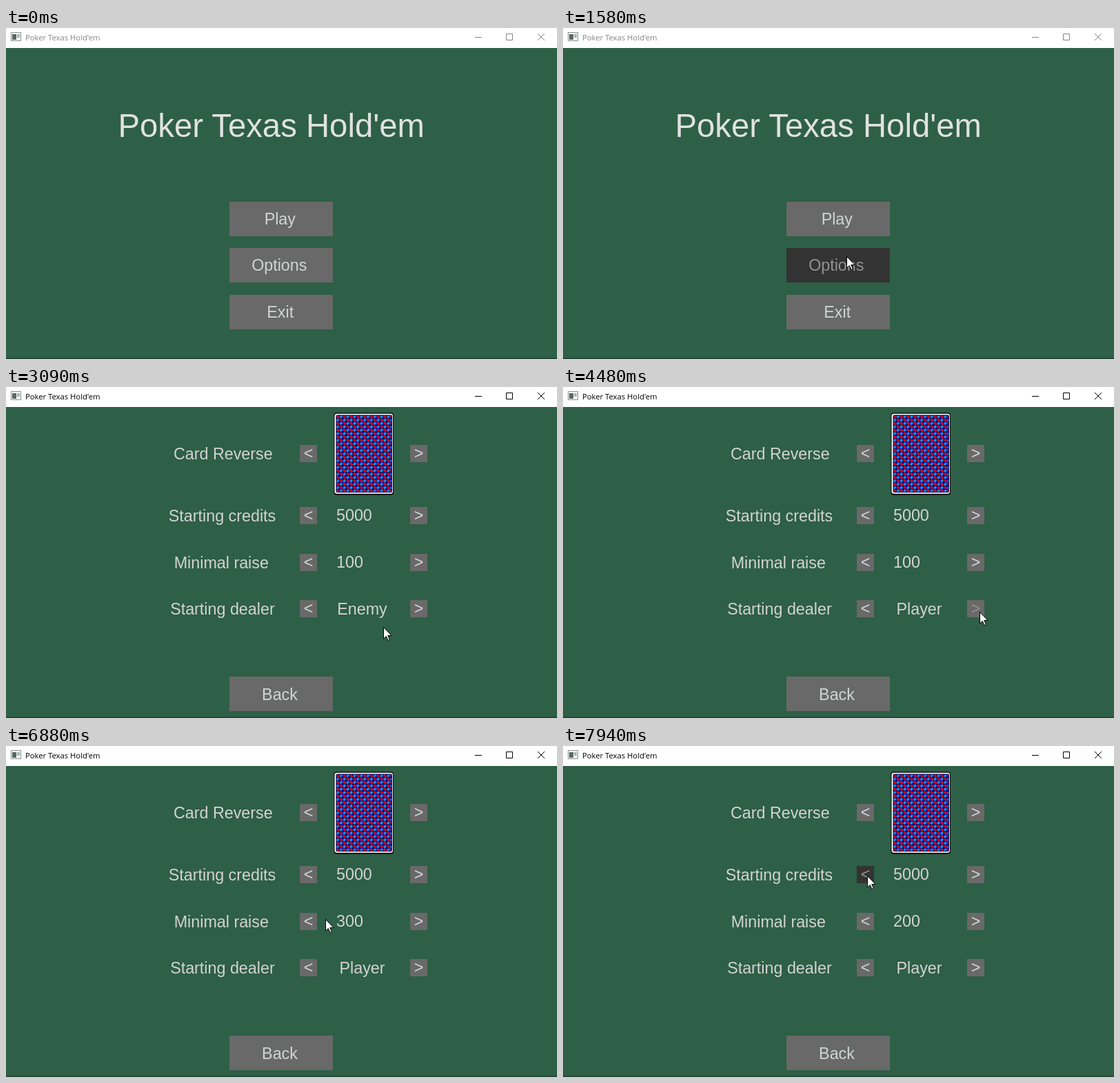
Write an HTML page that moves like this. It is 799 px wide and 480 px high and loops after 7990 ms.

```html
<!DOCTYPE html>
<html lang="en">
<head>
<meta charset="utf-8">
<title>Poker menu</title>
<style>
  html, body { margin: 0; width: 100%; height: 100%; overflow: hidden; background: #2e5f47; }
  svg { display: block; }
  text { font: 23.3px "Liberation Sans", Arial, sans-serif; fill: #d3d3d3; }
  .mid { text-anchor: middle; }
  .heading { font-size: 47.3px; fill: #e0e2e0; }
  .button rect { fill: #696969; }
  .button text { fill: #d0d6d3; }
  .button.hover rect { fill: #333; }
  .button.hover text, .button.flash text { fill: #929292; }
  .button.flash rect { fill: #696969; }
  #bar { color: #858585; }
  #bar.active { color: #000; }
  #bar text { font: 11.25px "Open Sans", "Noto Sans", sans-serif; fill: currentColor; }
  #bar path { fill: none; stroke: currentColor; }
</style>
</head>
<body>
<svg width="799" height="480" viewBox="0 0 799 480">
  <defs>
    <pattern id="weave" x="478.5" y="40.5" width="9.8" height="9.8" patternUnits="userSpaceOnUse">
      <rect width="10" height="10" fill="#0c1a9c"/>
      <path d="M0 4.9H9.8M4.9 0V9.8" stroke="#000040" stroke-width="1.2"/>
      <path d="M1 1L4.4 4.4M6 6L8.8 8.8" stroke="#f00010" stroke-width="3"/>
      <path d="M6 3.8L8.6 1.4M1.2 8.6L3.8 6.2" stroke="#20d8ff" stroke-width="2.5"/>
      <path d="M4.9 0L9.8 4.9M0 4.9L4.9 9.8" stroke="#0030e0" stroke-width=".9"/>
    </pattern>
  </defs>

  <rect width="799" height="480" fill="#2e5f47"/>
  <rect y="478.7" width="799" height="1.3" fill="#1d3c2d"/>

  <g id="bar">
    <rect width="799" height="29" fill="#fff"/>
    <rect x="7.5" y="6.5" width="14" height="12" fill="#f2f4f4" stroke="#8c9494"/>
    <rect x="9" y="9" width="6" height="8" fill="#596864"/>
    <rect x="16" y="9" width="4" height="5" fill="#a9b9b6"/>
    <text x="28" y="18">Poker Texas Hold'em</text>
    <path d="M680 13.5H690M725.5 8.5H734.5V17.5H725.5ZM771 8L781 18M781 8L771 18"/>
  </g>

  <g id="menu">
    <text class="heading" x="162.4" y="157.5">Poker Texas Hold'em</text>
  </g>

  <g id="options">
    <rect x="475.5" y="37.5" width="86.5" height="119" rx="4" fill="#000"/>
    <rect x="476.5" y="38.7" width="84.5" height="116" rx="3" fill="#fff"/>
    <rect x="479" y="41" width="80.5" height="111.5" rx="1" fill="url(#weave)" stroke="#000050"/>
    <text class="mid" x="314.8" y="105">Card Reverse</text>
    <text class="mid" x="313.5" y="195">Starting credits</text>
    <text class="mid" x="312.3" y="262.5">Minimal raise</text>
    <text class="mid" x="313.9" y="330">Starting dealer</text>
    <text x="479" y="194">5000</text>
    <text id="raise" x="479" y="261.5"></text>
    <text id="dealer" class="mid" x="516.5" y="330"></text>
  </g>

  <path id="cursor" d="M.5 .5V17L4.3 13.4L7 19.5L9.4 18.5L6.8 12.5H12Z" fill="#fff" stroke="#000"/>
</svg>
<script>
const LOOP = 7990;
const $ = id => document.getElementById(id);
const menu = $('menu'), options = $('options');
const buttons = [];

function addButton(page, label, x, y, w, h, textX, textY) {
  const node = document.createElementNS('http://www.w3.org/2000/svg', 'g');
  node.innerHTML = `<rect x="${x}" y="${y}" width="${w}" height="${h}"/>
    <text class="mid" x="${textX}" y="${textY}">${label}</text>`;
  page.append(node);
  const button = { node, page, x, y, w, h };
  buttons.push(button);
  return button;
}

addButton(menu, 'Play', 324, 252, 150, 50, 397.3, 285);
addButton(menu, 'Options', 324, 319, 150, 50, 396.3, 352);
addButton(menu, 'Exit', 324, 387, 150, 50, 397.7, 420);
addButton(options, 'Back', 324, 420, 150, 50, 397, 453.5);
let dealerNext;
for (const y of [84, 174, 242, 309]) {
  addButton(options, '&lt;', 426, y, 25, 25, 438.5, y + 20);
  dealerNext = addButton(options, '&gt;', 586, y, 25, 25, 598.5, y + 20);
}

// Pointer path: time, x, y
const path = [
  [1010, 621, 462], [1060, 615, 430], [1110, 597, 404], [1170, 570, 378],
  [1220, 545, 355], [1280, 497, 329], [1330, 450, 317], [1430, 424, 322],
  [1580, 411, 331], [1800, 410, 344], [1850, 410, 345],
  [2560, 410, 345], [2720, 420, 349], [2850, 450, 351], [3000, 510, 351],
  [3090, 547, 348], [3200, 585, 338], [3350, 602, 329], [3460, 604, 326],
  [5240, 604, 326], [5450, 603, 285], [5660, 601, 253],
  [6670, 601, 253], [6880, 463, 251], [7030, 441, 250],
  [7320, 440, 250], [7470, 440, 223], [7600, 440, 208], [7780, 440, 196], [7940, 441, 188]
];

function pointerAt(t) {
  const i = path.findIndex(p => p[0] > t);
  if (i < 0) return path.at(-1).slice(1);
  if (i === 0) return [path[0][1], path[0][2]];
  const [t0, x0, y0] = path[i - 1], [t1, x1, y1] = path[i];
  const k = (t - t0) / (t1 - t0);
  return [Math.round(x0 + (x1 - x0) * k), Math.round(y0 + (y1 - y0) * k)];
}

// Last value whose start time has passed
const valueAt = (t, steps) => steps.findLast(s => s[0] <= t)[1];
const within = (t, start, length) => t >= start && t < start + length;

function draw(t) {
  const shown = t >= 1010;
  const page = t < 2260 ? menu : options;
  const [x, y] = pointerAt(t);

  menu.style.display = page === menu ? '' : 'none';
  options.style.display = page === options ? '' : 'none';
  $('bar').setAttribute('class', t >= 2210 ? 'active' : '');
  $('raise').textContent = valueAt(t, [[0, 100], [6010, 200], [6310, 300], [7250, 200]]);
  $('dealer').textContent = valueAt(t, [[0, 'Enemy'], [3670, 'Random'], [4480, 'Player']]);

  const clicked = within(t, 3670, 50) || within(t, 4480, 50);
  for (const b of buttons) {
    const hover = shown && b.page === page &&
      x >= b.x && x < b.x + b.w && y >= b.y && y < b.y + b.h;
    const state = b === dealerNext && clicked ? ' flash' : hover ? ' hover' : '';
    b.node.setAttribute('class', 'button' + state);
  }

  $('cursor').style.display = shown ? '' : 'none';
  $('cursor').setAttribute('transform', `translate(${x} ${y})`);
}

const start = performance.now();
function tick() {
  draw((performance.now() - start) % LOOP);
  requestAnimationFrame(tick);
}
tick();
</script>
</body>
</html>
```
